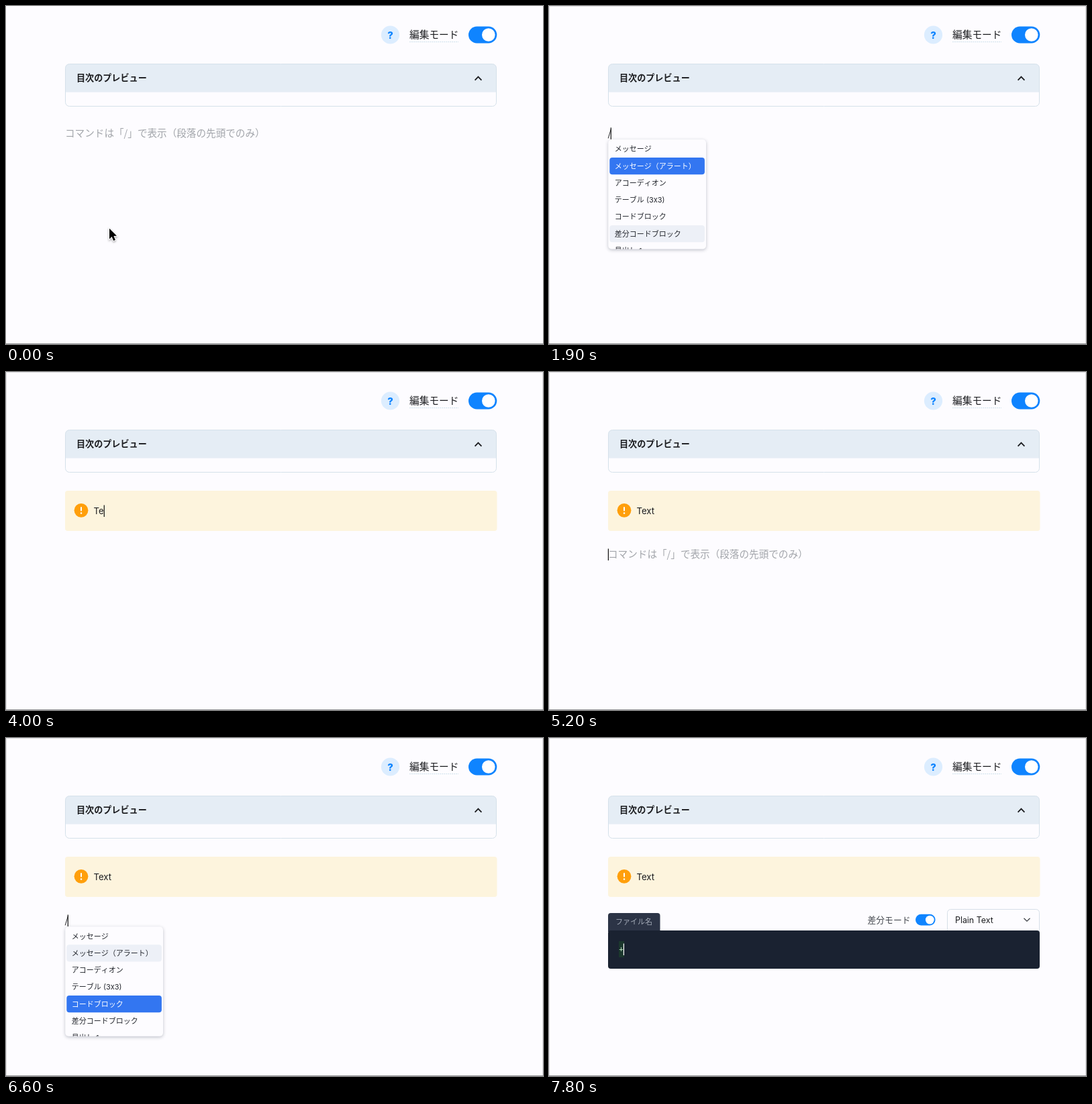
Animation, 800 px wide and 504 px high, one loop 8000 ms. Source, as an HTML page with a canvas:

```html
<!DOCTYPE html>
<html lang="ja">
<head>
<meta charset="utf-8">
<title>エディタのコマンド</title>
<style>
  html, body { margin: 0; width: 100%; height: 100%; overflow: hidden; background: #fdfcff; }
  canvas { display: block; width: 800px; height: 504px; }
</style>
</head>
<body>
<canvas id="stage" width="800" height="504"></canvas>
<script>
const ctx = document.getElementById('stage').getContext('2d');
const LOOP = 8000;
const CJK = '"Noto Sans CJK JP", "Noto Sans CJK", sans-serif';
const UI = `Inter, ${CJK}`;
const BLUE = '#0f84ff';
const INK = '#1c1d20';
const HINT = 'コマンドは「/」で表示（段落の先頭でのみ）';
const ITEMS = ['メッセージ', 'メッセージ（アラート）', 'アコーディオン', 'テーブル (3x3)',
  'コードブロック', '差分コードブロック', '見出し 1'];
const ROW = 25.25;
const POINTER_Y = 332;

// Event times in ms
const SLASH_1 = 500, MENU_1 = 600, MESSAGE = 3200, PARAGRAPH = 5200;
const SLASH_2 = 5500, MENU_2 = 5600, CODE = 7000, PLUS = 7700, FRAME = 1800;
const KEYS = [3900, 4000, 4200, 4300];
const CARET_RESETS = [400, SLASH_1, MESSAGE, ...KEYS, PARAGRAPH, SLASH_2, CODE, PLUS];

// [time, selected row]
const PICKS_1 = [[0, 0], [900, 1], [1100, 2], [1300, 3], [1500, 4], [1700, 3], [1800, 2],
  [1900, 1], [2100, 2], [2300, 3], [2500, 2], [2700, 1], [2900, 0]];
const PICKS_2 = [[0, 0], [6000, 1], [6200, 2], [6400, 3], [6600, 4], [6800, 5]];

const between = (t, a, b) => t >= a && t < b;
const latest = (list, t) => list.filter(([at]) => at <= t).pop()[1];

function box(x, y, w, h, r, fill, stroke) {
  ctx.beginPath();
  ctx.roundRect(x, y, w, h, r);
  if (fill) { ctx.fillStyle = fill; ctx.fill(); }
  if (stroke) { ctx.strokeStyle = stroke; ctx.lineWidth = 1; ctx.stroke(); }
}

function disc(x, y, r, fill) {
  ctx.beginPath();
  ctx.arc(x, y, r, 0, Math.PI * 2);
  ctx.fillStyle = fill;
  ctx.fill();
}

function line(points, color, width) {
  ctx.beginPath();
  points.forEach(([x, y]) => ctx.lineTo(x, y));
  ctx.strokeStyle = color;
  ctx.lineWidth = width;
  ctx.stroke();
}

// Text centred vertically on cy
function text(str, x, cy, size, color, { weight = 400, font = CJK, align = 'left' } = {}) {
  ctx.font = `${weight} ${size}px ${font}`;
  ctx.textAlign = align;
  ctx.fillStyle = color;
  ctx.fillText(str, x, cy + size * 0.37);
}

function toggle(x, y, w, h, knob) {
  box(x, y, w, h, h / 2, BLUE);
  disc(x + w - h / 2, y + h / 2, knob, '#fff');
}

function caret(x, cy, t, color = '#111') {
  const start = Math.max(...CARET_RESETS.filter(at => at <= t));
  if ((t - start) % 1000 >= 500) return;
  ctx.fillStyle = color;
  ctx.fillRect(x, cy - 8.5, 1.2, 17.5);
}

function header() {
  disc(572.5, 43, 13.6, '#dcedff');
  text('?', 572.5, 43, 15, BLUE, { weight: 800, font: UI, align: 'center' });
  text('編集モード', 601, 43, 14.7, INK);
  ctx.setLineDash([2, 1]);
  line([[601, 53.5], [674, 53.5]], '#cfe2ec', 1);
  ctx.setLineDash([]);
  toggle(689, 30.5, 42.3, 25, 9.8);
}

function contents() {
  box(88.5, 86.5, 642, 63, 6, '#fdfcff');
  box(88.5, 86.5, 642, 42, [6, 6, 0, 0], '#e5edf5');
  box(88.5, 86.5, 642, 63, 6, null, '#d5e1ea');
  text('目次のプレビュー', 105, 107.3, 13.1, INK, { weight: 700 });
  line([[698.6, 110.6], [703.5, 105.6], [708.4, 110.6]], INK, 1.8);
}

function menu(y, selected) {
  ctx.save();
  ctx.shadowColor = 'rgba(30, 40, 60, .28)';
  ctx.shadowBlur = 5;
  ctx.shadowOffsetY = 1.5;
  box(88.3, y, 145.7, 163.5, 5, '#fdfcff');
  ctx.restore();
  ctx.save();
  box(88.3, y, 145.7, 163.5, 5);
  ctx.clip();
  ITEMS.forEach((label, i) => {
    const top = y + 1.8 + i * ROW;
    const hover = between(POINTER_Y, top, top + ROW);
    const picked = i === selected;
    if (picked) box(90.3, top, 141.6, ROW, 4, hover ? '#2259e9' : '#3376f1');
    else if (hover) box(90.3, top, 141.6, ROW, 4, '#edf0f7');
    text(label, 97.8, top + 12.5, 11, picked ? '#fff' : '#25282f', { font: UI });
  });
  ctx.restore();
}

// Paragraph with its hint, or the slash and the menu below
function paragraph(cy, t, slashAt, menuAt, picks) {
  const typed = t >= slashAt;
  if (typed) text('/', 87.4, cy, 14.7, INK);
  else text(HINT, 88, cy, 14.6, '#a2a5aa');
  if (t >= 400) caret(typed ? 91.7 : 87.8, cy, t);
  if (t >= menuAt) menu(cy + 9.2, latest(picks, t));
}

function message(t) {
  box(88, 177, 643.5, 60, 4, '#fdf4dd');
  disc(112, 206.3, 10.4, '#ff9f0b');
  box(111, 201, 2, 6.6, 1, '#fff');
  disc(112, 210.6, 1.25, '#fff');
  const typed = 'Text'.slice(0, KEYS.filter(at => at <= t).length);
  text(typed, 130.5, 207, 13.2, INK, { font: UI });
  if (t < PARAGRAPH) caret(130.5 + ctx.measureText(typed).width, 207, t);
}

function codeBlock(t) {
  box(88, 261, 77.5, 28, [4, 4, 0, 0], '#2c3446');
  text('ファイル名', 99, 274, 11, '#a4abb8');
  text('差分モード', 474.5, 271, 12.8, '#43474e');
  toggle(546, 262.8, 29.6, 16.6, 6.4);
  box(593.5, 255.5, 137, 36, 5, '#fdfcff', '#d6dfe7');
  text('Plain Text', 605, 271.3, 12.4, INK, { font: UI });
  line([[707.5, 268.8], [712, 273.2], [716.5, 268.8]], '#3a3d43', 1.2);
  box(88, 287, 643, 57, 4, '#1a2231');
  if (t >= PLUS) {
    ctx.fillStyle = '#1b372d';
    ctx.fillRect(104, 303, 8, 24);
    text('+', 103.8, 315, 12.5, '#bfe5c4', { font: '"Noto Sans Mono", monospace' });
  }
  caret(t >= PLUS ? 110.8 : 104, 315, t, '#fff');
}

function pointer() {
  const shape = [[0, 0], [0, 15.6], [3.6, 12.3], [6.2, 18.2], [8.9, 17], [6.4, 11.3], [11, 11]];
  ctx.save();
  ctx.translate(154, 331.8);
  ctx.shadowColor = 'rgba(0, 0, 0, .35)';
  ctx.shadowBlur = 3;
  ctx.shadowOffsetY = 1.5;
  ctx.beginPath();
  shape.forEach(([x, y]) => ctx.lineTo(x, y));
  ctx.closePath();
  ctx.strokeStyle = '#fff';
  ctx.lineWidth = 2;
  ctx.stroke();
  ctx.shadowColor = 'transparent';
  ctx.fillStyle = '#000';
  ctx.fill();
  ctx.restore();
}

function draw(t) {
  ctx.fillStyle = '#fdfcff';
  ctx.fillRect(0, 0, 800, 504);
  if (t >= FRAME) box(0.5, 0.5, 799, 503, 0, null, '#dfdee2');
  ctx.fillStyle = '#97979a';
  ctx.fillRect(0, 503, 800, 1);
  header();
  contents();
  if (t < MESSAGE) paragraph(189.8, t, SLASH_1, MENU_1, PICKS_1);
  else message(t);
  if (between(t, PARAGRAPH, CODE)) paragraph(272, t, SLASH_2, MENU_2, PICKS_2);
  if (t >= CODE) codeBlock(t);
  if (t < SLASH_1) pointer();
}

const begin = performance.now();
function tick() {
  draw((performance.now() - begin) % LOOP);
  requestAnimationFrame(tick);
}
tick();
</script>
</body>
</html>
```
